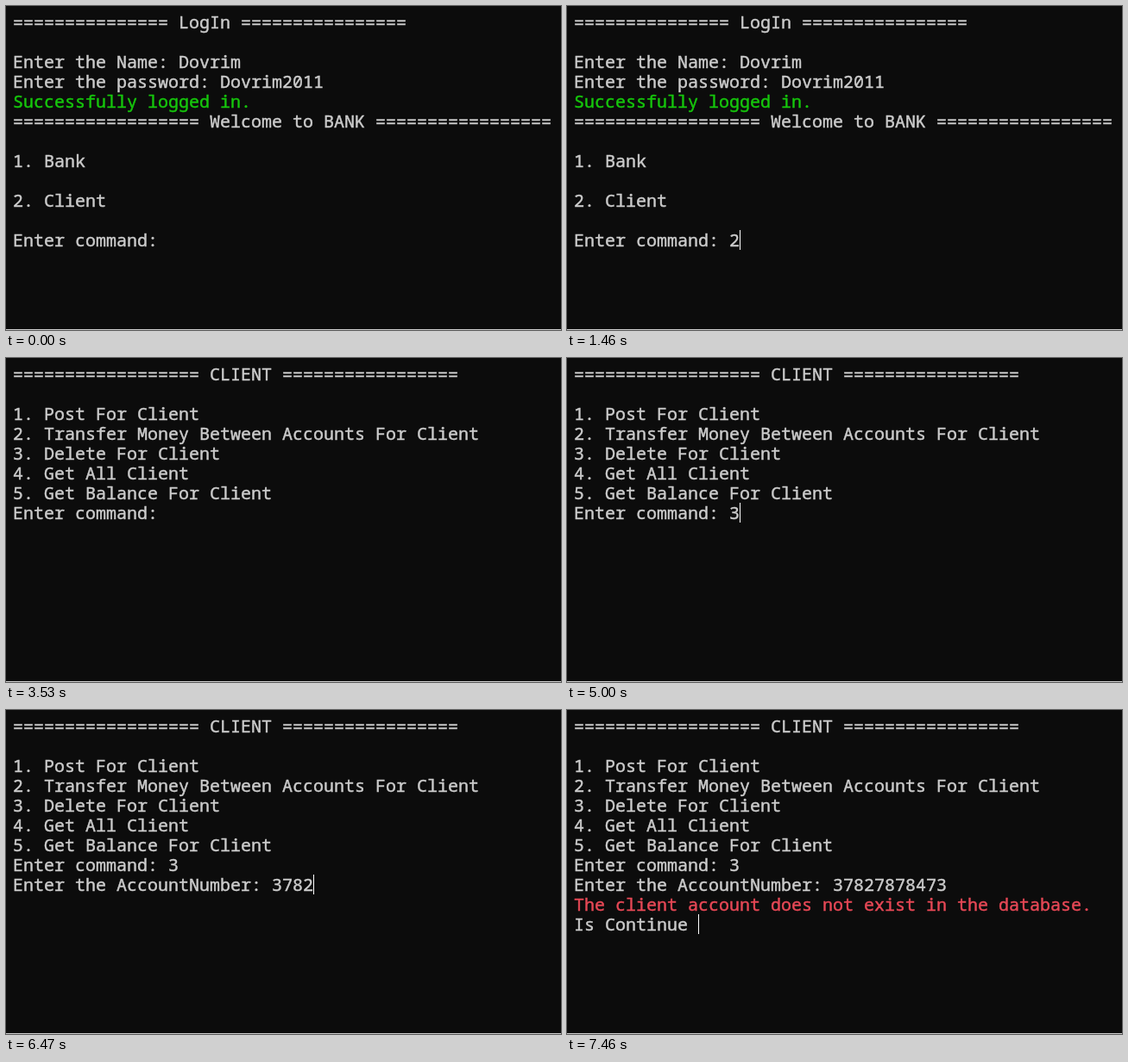
Recreate the animation shown at these times as an HTML page. Size 643 px wide and 376 px high, loop 8 s.

```html
<!DOCTYPE html>
<html lang="en">
<head>
<meta charset="utf-8">
<title>Console</title>
<style>
  html, body { margin: 0; width: 100%; height: 100%; overflow: hidden; background: #0c0c0c; }
  svg { display: block; width: 643px; height: 376px; }
  text {
    font: 20px "Noto Sans Mono", "DejaVu Sans Mono", monospace;
    font-variant-ligatures: none;
    white-space: pre;
    color: #ccc;
    fill: currentColor;
    stroke: currentColor;
    stroke-width: .45px;
  }
  .good { color: #16c60c; }
  .bad { color: #e74856; }
  #pointer { fill: #fff; stroke: #000; paint-order: stroke; }
</style>
</head>
<body>
<svg viewBox="0 0 643 376">
  <rect width="643" height="376" fill="#0c0c0c"/>
  <rect y="375" width="643" height="1" fill="#ccc"/>
  <g id="lines"></g>
  <rect id="caret" width="1" height="23" fill="#fff"/>
  <path id="pointer" d="M0 0V15.5L3.6 12.2L6 17.8L8.4 16.8L6 11.3H11Z"/>
</svg>
<script>
const LOOP = 8000, CELL = 12, ROW = 23, LEFT = 8, TOP = 7, BASELINE = 19;
const lines = document.getElementById('lines');
const caret = document.getElementById('caret');
const pointer = document.getElementById('pointer');

const banner = (before, title, after) => `${'='.repeat(before)} ${title} ${'='.repeat(after)}`;

const login = [
  banner(15, 'LogIn', 16),
  '',
  'Enter the Name: Dovrim',
  'Enter the password: Dovrim2011',
  { text: 'Successfully logged in.', kind: 'good' },
  banner(18, 'Welcome to BANK', 17),
  '',
  '1. Bank',
  '',
  '2. Client',
  '',
  'Enter command: '
];
const client = [
  banner(18, 'CLIENT', 17),
  '',
  '1. Post For Client',
  '2. Transfer Money Between Accounts For Client',
  '3. Delete For Client',
  '4. Get All Client',
  '5. Get Balance For Client',
  'Enter command: '
];
const account = [...client.slice(0, -1), 'Enter command: 3', 'Enter the AccountNumber: '];
const digits = '37827878473';
const missing = [
  ...account.slice(0, -1),
  account.at(-1) + digits,
  { text: 'The client account does not exist in the database.', kind: 'bad' },
  'Is Continue '
];

// [start, screen, typed input, caret visible]
const typing = [[6270, 1], [6330, 2], [6400, 3], [6470, 4], [6530, 5], [6600, 6], [6730, 8], [6800, 9], [6930, 11]];
const states = [
  [0, login, '', false],
  [1190, login, '', true],
  [1390, login, '2', true],
  [1850, client, '', true],
  [2460, client, '', false],
  [2990, client, '', true],
  [3530, client, '', false],
  [4060, client, '', true],
  [4600, client, '', false],
  [5000, client, '3', true],
  [5200, account, '', true],
  [5870, account, '', false],
  ...typing.map(([time, count]) => [time, account, digits.slice(0, count), true]),
  [7460, missing, '', true]
];

// [start, x, y]; a step without a position hides the pointer
const path = [
  [534, 366], [500, 352], [455, 340], [405, 330], [355, 322], [312, 316],
  [278, 310], [252, 305], [244, 301], [250, 298], [258, 295]
];
const moves = [
  [0],
  ...path.map(([x, y], i) => [260 + 66 * i, x, y]),
  [1190, 261, 294],
  [1460]
];

const current = (steps, time) => steps.findLast(step => step[0] <= time);

function drawScreen(screen, input, caretOn) {
  const last = screen.length - 1;
  lines.replaceChildren(...screen.map((line, row) => {
    const node = document.createElementNS('http://www.w3.org/2000/svg', 'text');
    node.setAttribute('x', LEFT);
    node.setAttribute('y', TOP + BASELINE + ROW * row);
    if (line.kind) node.setAttribute('class', line.kind);
    node.textContent = (line.text ?? line) + (row === last ? input : '');
    return node;
  }));
  caret.setAttribute('x', LEFT + CELL * (screen[last].length + input.length));
  caret.setAttribute('y', TOP + ROW * last);
  caret.style.display = caretOn ? '' : 'none';
}

function drawPointer(x, y) {
  pointer.style.display = x === undefined ? 'none' : '';
  if (x !== undefined) pointer.setAttribute('transform', `translate(${x} ${y})`);
}

const start = performance.now();
let shownState, shownMove;

function render() {
  const time = (performance.now() - start) % LOOP;
  const state = current(states, time), move = current(moves, time);
  if (state !== shownState) drawScreen(...state.slice(1));
  if (move !== shownMove) drawPointer(...move.slice(1));
  shownState = state;
  shownMove = move;
  requestAnimationFrame(render);
}
render();
</script>
</body>
</html>
```
